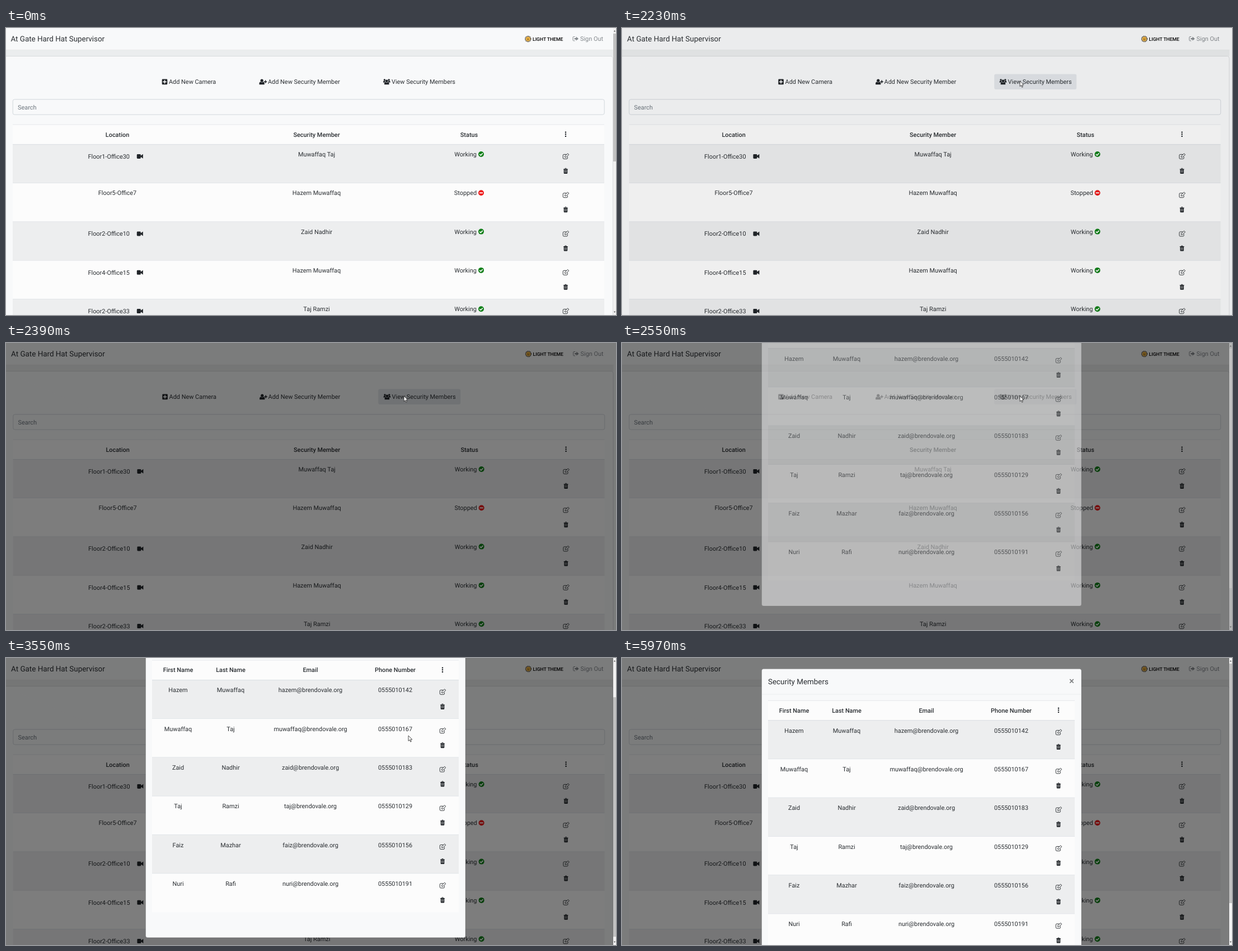
An HTML page that plays this animation: 1090x514 px, repeating every 6.35 s.

```html
<!DOCTYPE html>
<html lang="en">
<head>
<meta charset="utf-8">
<title>Security members</title>
<style>
html, body { margin: 0; width: 100%; height: 100%; overflow: hidden; background: #f8f9fa; }
svg { display: block; width: 1090px; height: 514px; }
text { font: 10.9px Roboto, "Open Sans", sans-serif; fill: #2a2e32; text-rendering: geometricPrecision; }
.mid { text-anchor: middle; }
.head { font-weight: 500; text-anchor: middle; }
.title { font-size: 13.4px; }
.muted { fill: #6c757d; }
.pale { fill: #858a8e; }
.theme { font-size: 8.6px; font-weight: 500; fill: #000; }
.close { font-size: 17px; font-weight: 500; fill: #7f8183; text-anchor: middle; }
.line { fill: none; stroke: currentColor; }
</style>
</head>
<body>
<svg id="stage" viewBox="0 0 1090 514"></svg>
<script>
const LOOP = 6350, FIRST = 512, TICK = 77.5, ROW = 69.3;
const INK = '#212529', RULE = '#dee2e6';

const icons = {
  plus: '<path fill-rule="evenodd" d="M-3.5-4.8h7q1.3 0 1.3 1.3v7q0 1.3-1.3 1.3h-7q-1.3 0-1.3-1.3v-7q0-1.3 1.3-1.3zM-.8-3.2v2.4h-2.4v1.6h2.4v2.4h1.6v-2.4h2.4v-1.6h-2.4v-2.4z"/>',
  userPlus: '<circle cx="-1.8" cy="-2.2" r="2.6"/><path d="M-6.4 4.8q-.6-4.8 2.2-4.8q2.4 1.7 4.8 0q2.7 0 2.2 4.8zM2-1h1.9v-1.9h1.5v1.9h1.9v1.5h-1.9v1.9h-1.5v-1.9h-1.9z"/>',
  users: '<circle cx="-3.9" cy="-3.2" r="1.7"/><circle cx="3.9" cy="-3.2" r="1.7"/><circle cy="-1.3" r="2.4"/><path d="M-6.2 1.5q-.4-3 1-3h2.2l.4 2.4zM6.2 1.5q.4-3-1-3h-2.2l-.4 2.4zM-4.2 5q-.6-4.3 2-4.3q2.2 1.6 4.4 0q2.6 0 2 4.3z"/>',
  camera: '<path d="M-5.5-2.6q0-1.4 1.4-1.4h4.2q1.4 0 1.4 1.4v1.5l4-3v8l-4-3v1.7q0 1.4-1.4 1.4h-4.2q-1.4 0-1.4-1.4z"/>',
  check: '<circle r="5"/><path d="M-2.7 0l2 2 3.5-3.7" fill="none" stroke="#fff" stroke-width="1.6"/>',
  stop: '<circle r="5"/><path d="M-3-.9h6v1.8h-6z" fill="#fff"/>',
  edit: '<path class="line" stroke-width=".9" d="M3.4.9v2.3q0 1.5-1.5 1.5h-5.1q-1.5 0-1.5-1.5v-5q0-1.5 1.5-1.5h4.6M-1.3 1.7v-2l5-4.6 2.2 2-5 4.6z"/>',
  trash: '<path d="M-4-3.6h8v1h-.7v6.3q0 1.2-1.2 1.2h-4.2q-1.2 0-1.2-1.2v-6.3h-.7z"/><path class="line" d="M-1.6-3.6l.5-1h2.2l.5 1"/><path d="M-1.6-1.7v4.7M0-1.7v4.7M1.6-1.7v4.7" stroke="#ddd" stroke-width=".6"/>',
  more: '<path d="M-1.1-4.7h2.2v2.2h-2.2zM-1.1-1.1h2.2v2.2h-2.2zM-1.1 2.5h2.2v2.2h-2.2z"/>',
  signOut: '<path class="line" d="M-1.5-3.7h-2.2q-1.2 0-1.2 1.2v5q0 1.2 1.2 1.2h2.2"/><path d="M-2.3-1.3h3v-2.3l4.3 3.6-4.3 3.6v-2.3h-3z"/>',
  sun: '<circle r="4.8" class="line" stroke-width="1.6" stroke-dasharray="1.7 .8"/><circle r="3.9" fill="#eeb13c"/><path d="M-1.7-.8h1M.7-.8h1M-1.7 1q1.7 1.6 3.4 0" class="line" stroke-width=".8"/>'
};

const icon = (name, x, y, color = INK) =>
  `<g transform="translate(${x} ${y})" fill="${color}" color="${color}">${icons[name]}</g>`;
const label = (text, x, y, cls = '') => `<text x="${x}" y="${y}" class="${cls}">${text}</text>`;
const rect = (x, y, w, h, fill, more = '') =>
  `<rect x="${x}" y="${y}" width="${w}" height="${h}" fill="${fill}" ${more}/>`;

// Striped table; drawRow gets the row's data and its top edge
function table(x, y, w, heads, columns, rows, drawRow) {
  const top = y + 35.4, actions = columns.at(-1);
  let out = rect(x, y, w, 35.4, '#fcfcfc') + rect(x, y - .4, w, .8, RULE);
  heads.forEach((h, i) => out += label(h, columns[i], y + 21.5, 'head'));
  out += icon('more', actions, y + 17.2);
  rows.forEach((row, i) => {
    const ry = top + i * ROW;
    out += rect(x, ry, w, ROW, i % 2 ? '#fcfcfc' : '#edeeef')
      + rect(x, ry - .5, w, i ? .8 : 1.3, RULE)
      + drawRow(row, ry) + icon('edit', actions, ry + 21.3) + icon('trash', actions, ry + 47.6);
  });
  return out;
}

const track = rect(1085, 0, 5, 514, '#f1f1f1')
  + '<path d="M1086 6.5l1.5-2.5 1.5 2.5zM1086 507.5l1.5 2.5 1.5-2.5z" fill="#505050"/>';
const thumb = (height, id) => rect(1085, 10, 5, height, '#c1c1c1', `id="${id}"`);

const cameras = [
  ['Floor1-Office30', 'Muwaffaq Taj', true],
  ['Floor5-Office7', 'Hazem Muwaffaq', false],
  ['Floor2-Office10', 'Zaid Nadhir', true],
  ['Floor4-Office15', 'Hazem Muwaffaq', true],
  ['Floor2-Office33', 'Taj Ramzi', true]
];
const members = [
  ['Hazem', 'Muwaffaq', '0555010142'],
  ['Muwaffaq', 'Taj', '0555010167'],
  ['Zaid', 'Nadhir', '0555010183'],
  ['Taj', 'Ramzi', '0555010129'],
  ['Faiz', 'Mazhar', '0555010156'],
  ['Nuri', 'Rafi', '0555010191']
];

const cameraRow = ([place, name, on], y) =>
  (on ? label(place, 183.7, y + 25.2, 'mid') + icon('camera', 239.3, y + 21.5)
      : label(place, 199, y + 21.7, 'mid'))
  + label(name, 555, y + 21.7, 'mid')
  + label(on ? 'Working' : 'Stopped', 821, y + 21.7, 'mid')
  + icon(on ? 'check' : 'stop', 849, y + 17.6, on ? '#12801a' : '#ee1c1c');

const memberColumns = [307.5, 401.5, 544, 695.5, 780];
const memberRow = ([first, last, phone], y) =>
  [first, last, first.toLowerCase() + '@brendovale.org', phone]
    .map((text, i) => label(text, memberColumns[i], y + 22, 'mid')).join('');

const page = rect(-5, 39, 1090, 11.5, '#ebedee') + rect(-5, 38.8, 1090, .6, '#e3e5e7')
  + '<path d="M-5 50.5h1086q3.5 0 3.5 3.5v470" fill="#f8f9fa" stroke="#d6d9db" stroke-width=".9"/>'
  + label('At Gate Hard Hat Supervisor', 8.5, 24.4, 'title')
  + icon('sun', 932.8, 19.6, '#3b3222') + label('LIGHT THEME', 941, 23, 'theme')
  + icon('signOut', 1018, 19.2, '#858a8e') + label('Sign Out', 1026, 23.2, 'pale')
  + rect(664.6, 82.5, 147, 27.5, '#e2e6ea', 'rx="3" id="hover"')
  + icon('plus', 283.5, 96.4) + label('Add New Camera', 291, 100.4)
  + icon('userPlus', 459, 96.4) + label('Add New Security Member', 468, 100.4)
  + icon('users', 680.3, 96.2) + label('View Security Members', 689, 100.4)
  + rect(12.2, 127.9, 1057, 27.2, '#f8f9fa', 'rx="3" stroke="#ced4da" stroke-width=".9"')
  + label('Search', 21, 145.6, 'muted')
  + table(12, 173, 1057, ['Location', 'Security Member', 'Status'], [199, 555, 827.5, 1000], cameras, cameraRow);

const dialog = rect(249.6, 19.6, 571.3, 553.4, '#f8f9fa', 'rx="3.5" stroke="#000" stroke-opacity=".2" stroke-width=".7"')
  + label('Security Members', 261, 46.5, 'title') + label('×', 803.5, 47.3, 'close')
  + rect(250, 64.6, 570.5, .8, '#e6e9ec')
  + table(261, 76.2, 548, ['First Name', 'Last Name', 'Email', 'Phone Number'], memberColumns, members, memberRow);

const $ = id => document.getElementById(id);
$('stage').innerHTML = rect(0, 0, 1090, 514, '#f8f9fa')
  + `<g id="page">${page}</g><g id="pageBar">${track}${thumb(229, 'pageThumb')}</g>`
  + rect(0, 0, 1090, 514, '#000', 'id="shade"')
  + `<g id="modal"><g id="dialog">${dialog}</g>${track}</g>${thumb(429, 'modalThumb')}`
  + '<path id="cursor" d="M0 0v9.6l2.2-2 1.6 3.6 1.5-.7-1.6-3.5h3.1z" fill="#fff" stroke="#222" stroke-width=".8"/>';

const clamp = v => Math.min(1, Math.max(0, v));
const smooth = p => p * p * (3 - 2 * p);

// Cursor legs: start tick, end tick, target
const legs = [[0, 8, 779, 198], [8, 17, 711, 95], [33, 34, 713, 109], [34, 38, 719, 139], [61, 69, 1077, 510]];
function cursorAt(k) {
  let x = 1083, y = 508;
  for (const [from, to, tx, ty] of legs) {
    const p = smooth(clamp((k - from) / (to - from)));
    x += (tx - x) * p;
    y += (ty - y) * p;
  }
  return [x, y];
}

function scrollAt(k) {
  const down = smooth(clamp((k - 34) / 6));
  const up = clamp((k - 49) / 3);
  return 78 * down * (1 - up) ** 2.28;
}

const show = (id, on) => $(id).setAttribute('visibility', on ? 'visible' : 'hidden');
const move = (id, x, y) => $(id).setAttribute('transform', `translate(${x} ${y})`);

function draw(t) {
  // The screen refreshes in even ticks
  const k = Math.floor((t - FIRST) / TICK);
  const opened = k >= 22, scroll = scrollAt(k);
  show('cursor', k >= 0 && k < 70);
  move('cursor', ...cursorAt(k));
  show('hover', k >= 18);
  show('pageBar', !opened);
  move('page', opened ? .6 : 0, 0);
  $('shade').setAttribute('opacity', opened ? Math.min(.5, .05 + (k - 22) * .225) : 0);
  $('modal').setAttribute('opacity', clamp((k - 25) / 2));
  move('dialog', 0, -25.5 * Math.max(0, 28 - Math.max(k, 25)) ** 2 - scroll);
  show('modalThumb', k > 25);
  move('modalThumb', 0, scroll * 494 / 592);
}

const start = performance.now();
function loop() {
  draw((performance.now() - start) % LOOP);
  requestAnimationFrame(loop);
}
loop();
</script>
</body>
</html>
```
